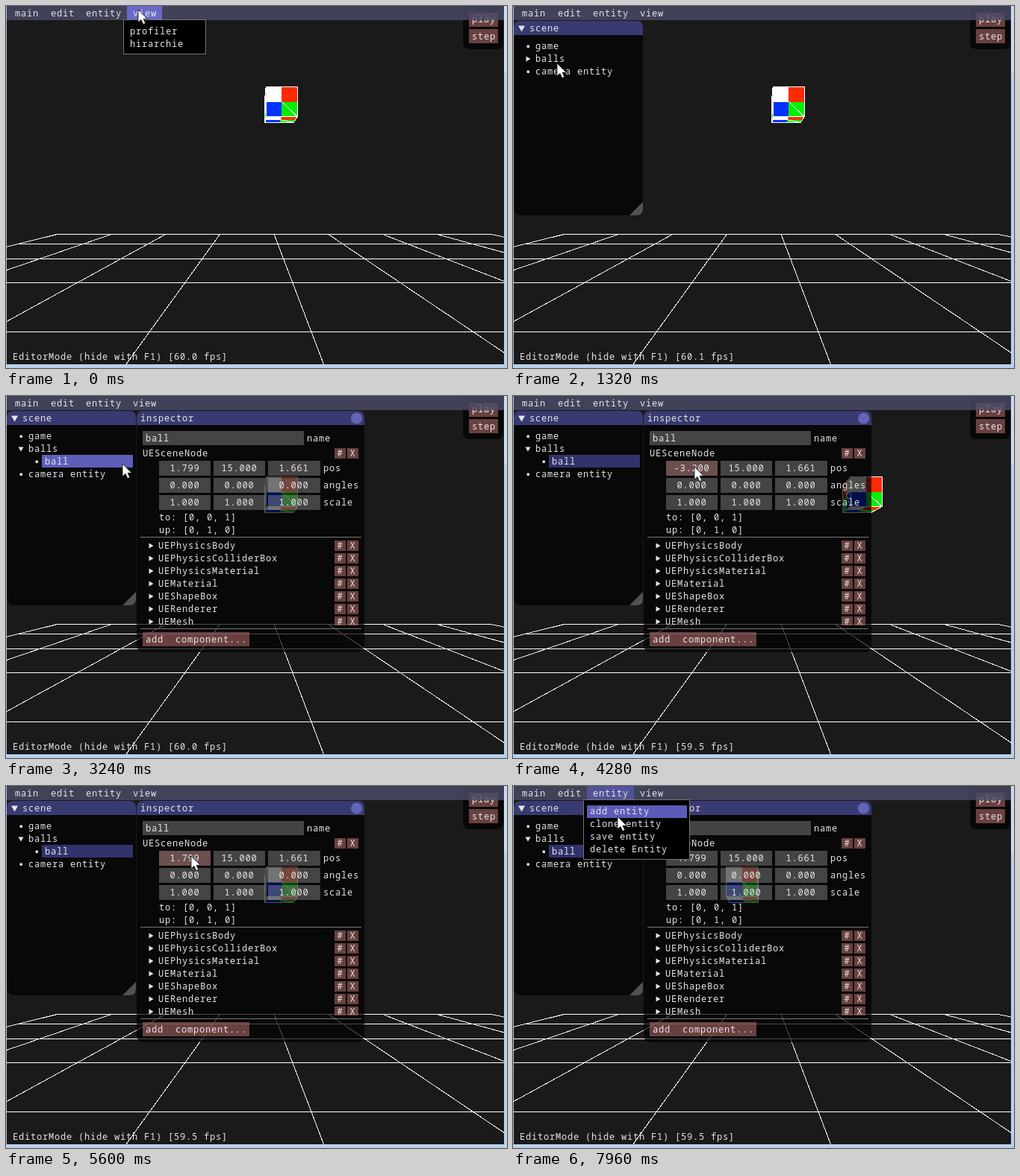
Animation, 671 px wide and 486 px high, one loop 8000 ms. Source, as an HTML page:

```html
<!DOCTYPE html>
<html lang="en">
<head>
<meta charset="utf-8">
<title>Scene editor</title>
<style>
  html, body { margin: 0; width: 100%; height: 100%; overflow: hidden; background: #1a1a1a; }
  svg { display: block; width: 671px; height: 486px; }
  text {
    font: 12px "Noto Sans Mono", "DejaVu Sans Mono", monospace;
    letter-spacing: .8px; fill: #e6e6e6; white-space: pre;
  }
  .mid { text-anchor: middle; }
  .crisp { shape-rendering: crispEdges; }
  .grid { stroke: #fff; fill: none; }
</style>
</head>
<body>
<svg id="stage" viewBox="0 0 671 486" xmlns="http://www.w3.org/2000/svg"></svg>
<script>
const LOOP = 8000, STEP = 40;
const VX = 334, VY = 240.5;         // vanishing point
const EYE = 394.2;                  // floor drop in px at depth 1
const C = {
  field: 'rgba(204,204,204,.3)',
  fieldHover: 'rgba(230,204,204,.4)',
  fieldActive: 'rgba(230,166,166,.45)',
  button: 'rgba(171,102,102,.6)',
  header: 'rgba(102,102,230,.45)',
  headerHover: 'rgba(115,115,230,.8)',
  title: 'rgba(69,69,138,.83)',
  bar: 'rgba(76,76,104,.8)',
  panel: 'rgba(0,0,0,.7)',
  line: '#777'
};

const rect = (x, y, w, h, fill, more = '') =>
  `<rect x="${x}" y="${y}" width="${w}" height="${h}" fill="${fill}" ${more}/>`;
const text = (x, mid, str, more = '') => `<text x="${x}" y="${mid + 4}" ${more}>${str}</text>`;
const poly = (pts, fill, more = '') =>
  `<polygon points="${pts.map(p => p.map(n => n.toFixed(2)).join()).join(' ')}" fill="${fill}" ${more}/>`;
const group = (id, body, more = '') => `<g id="${id}" ${more}>${body}</g>`;
const titleBar = (x, w) =>
  `<path d="M${x} 39V29q0-9 9-9h${w - 18}q9 0 9 9v10z" fill="${C.title}"/>`;
const arrowRight = (x, y) => poly([[x, y - 3.5], [x + 6, y], [x, y + 3.5]], '#e6e6e6');
const arrowDown = (x, y, r) => poly([[x - r, y - r + 1], [x + r, y - r + 1], [x, y + r]], '#e6e6e6');
const dot = (x, y) => rect(x - 1.5, y - 1.5, 3.5, 3.5, '#e6e6e6', 'rx="1"');

function floor() {
  let d = '';
  const edge = i => -264.2 + 72.3 * i;
  const rowY = n => VY + EYE / n;
  for (let n = 2; n <= 6; n++) {
    d += `M${VX + edge(0) * 6 / n} ${Math.floor(rowY(n)) + .5}H${VX + edge(8) * 6 / n}`;
  }
  for (let i = 0; i < 9; i++) d += `M${VX + edge(i)} ${rowY(6)}L${VX + edge(i) * 6} ${rowY(1)}`;
  return `<path class="grid crisp" d="${d}"/>`;
}

function cube(value) {
  const left = 14.2 + 20.8 * (1.7995 - value), right = left + 42;
  const at = (u, v, w) => {
    const s = 21 / (21 + 2 * w);
    return [VX + (left + 42 * u) * s, VY + (-132 + 40 * v) * s];
  };
  const tones = ['#fff', '#ff2a00', '#0033ff', '#00f000'];
  const face = (f, order) => {
    let out = '';
    order.forEach((tone, i) => {
      const a = i % 2 / 2, b = (i >> 1) / 2;
      out += poly([f(a, b), f(a + .5, b), f(a + .5, b + .5), f(a, b + .5)], tones[tone]);
    });
    out += poly([f(0, 0), f(1, 0), f(1, 1), f(0, 1)], 'none', 'stroke="#fff"');
    return out + poly([f(0, 0), f(1, 1)], 'none', 'stroke="#fff"');
  };
  let out = face((a, b) => at(a, 1, b), [0, 1, 2, 3]);
  if (left > 0) out += face((a, b) => at(0, b, 1 - a), [1, 0, 3, 2]);
  if (right < 0) out += face((a, b) => at(1, b, a), [0, 1, 2, 3]);
  return out + face((a, b) => at(a, b, 0), [0, 1, 2, 3]);
}

const toolPanel = () =>
  `<path d="M612 0H666V49q0 9-9 9H621q-9 0-9-9z" fill="${C.panel}"/>` +
  rect(620, 9, 39, 19, C.button) + text(624, 18, 'play') +
  rect(620, 31, 39, 19, C.button) + text(624, 41, 'step');

const menuBar = () =>
  rect(1, 0, 666, 19, C.bar) +
  rect(162, 0, 47, 19, 'none', 'id="viewTab"') + rect(99, 0, 63, 19, 'none', 'id="entityTab"') +
  text(12, 10, 'main') + text(60, 10, 'edit') + text(107, 10, 'entity') + text(170, 10, 'view');

const sceneWindow = () =>
  rect(1, 20, 173, 261, C.panel, 'rx="9"') + titleBar(1, 173) +
  arrowDown(11.5, 30, 4.5) + text(22, 30, 'scene') +
  '<path d="M174 263V272q0 9-9 9H156z" fill="rgba(255,255,255,.3)"/>' +
  rect(48, 79, 122, 17, 'none', 'id="selected"') + rect(0, 0, 0, 17, C.headerHover, 'id="hover"') +
  dot(20, 54) + text(30, 54, 'game') +
  group('closedArrow', arrowRight(17.5, 71)) + text(30, 71, 'balls') +
  group('child', arrowDown(20, 71, 3.5) + dot(41, 88) + text(52, 88, 'ball')) +
  group('camera', dot(20, 88) + text(30, 88, 'camera entity'));

function inspectorWindow() {
  const pair = y => rect(440, y - 7, 15, 14, C.button) + rect(457, y - 7, 15, 14, C.button) +
    text(443.5, y, '#') + text(460.5, y, 'X');
  let out = rect(175, 20, 305, 324, C.panel, 'rx="9" id="inspectorBack"') + titleBar(175, 305) +
    text(180, 30, 'inspector') + '<circle cx="469.5" cy="30" r="7.5" fill="rgba(128,128,230,.6)"/>' +
    rect(183, 47, 216, 19, C.field) + text(187, 57, 'ball', 'id="name"') + text(403, 57, 'name') +
    text(183, 77, 'UESceneNode') + pair(77);
  ['pos', 'angles', 'scale'].forEach((label, r) => {
    const y = 97 + 23 * r;
    [205, 278, 351].forEach((x, c) => {
      out += rect(x, y - 10, c < 2 ? 69 : 70, 20, C.field, `id="f${r}${c}"`) +
        text(x + 34.5, y, r === 2 ? '1.000' : '0.000', `id="v${r}${c}" class="mid"`);
    });
    out += text(425, y, label);
  });
  out += text(205, 163, 'to: [0, 0, 1]') + text(205, 180, 'up: [0, 1, 0]') + rect(180, 189, 296, 1, C.line);
  const parts = ['PhysicsBody', 'PhysicsColliderBox', 'PhysicsMaterial', 'Material', 'ShapeBox', 'Renderer', 'Mesh'];
  out += group('parts', parts.map((p, i) => {
    const y = 201 + 17 * i;
    return arrowRight(191.5, y) + text(204, y, 'UE' + p) + pair(y);
  }).join(''), 'clip-path="url(#partsClip)"');
  return out + group('footer', rect(180, 312, 296, 1, C.line) +
    rect(183, 317, 143, 19, C.button) + text(187, 327, 'add  component...'));
}

const popup = (id, x, w, items) => group(id,
  rect(x + .5, 18.5, w - 1, 12 + 17 * items.length, '#000', 'stroke="#747474"') +
  rect(x + 5, 26, w - 9, 17, 'none', `id="${id}Row"`) +
  items.map((s, i) => text(x + 9, 34 + 17 * i, s)).join(''));

document.getElementById('stage').innerHTML =
  '<defs><clipPath id="partsClip"><rect x="175" y="190" width="305" height="118"/></clipPath></defs>' +
  rect(0, 0, 671, 486, '#1a1a1a') + floor() + group('cube', '', 'class="crisp"') +
  text(9, 471, '', 'id="status"') + toolPanel() +
  group('scene', sceneWindow()) + group('inspector', inspectorWindow()) + menuBar() +
  popup('viewMenu', 157, 111, ['profiler', 'hirarchie']) +
  popup('entityMenu', 94, 143, ['add entity', 'clone entity', 'save entity', 'delete Entity']) +
  rect(0, 0, 1, 486, '#a9c3de') + rect(667, 0, 4, 486, '#b9d1ea') + rect(667, 0, 4, 90, '#cbdcee') +
  rect(0, 481, 671, 5, '#b9d1ea') +
  group('cursor', '<path d="M0 0V17L4 13.4L6.8 19.6L9.8 18.3L7.1 12.3H12.3Z" fill="#fff" stroke="#111" stroke-width=".8"/>');

const ui = {};
document.querySelectorAll('[id]').forEach(e => ui[e.id] = e);

// [time, x, y] of the pointer tip
const path = [
  [0, 177, 5], [160, 182, 24], [400, 190, 48], [680, 190, 52], [840, 190, 52], [1000, 140, 64],
  [1200, 74, 92], [1320, 59, 77], [1400, 54, 71], [1480, 54, 71], [1640, 17, 71], [1720, 18, 71],
  [1880, 18, 71], [2080, 50, 82], [2320, 90, 87], [2600, 90, 87], [2960, 138, 88], [3120, 138, 88],
  [3240, 156, 91], [3320, 226, 108], [3840, 226, 108], [4000, 248, 95], [4080, 248, 95],
  [4640, 234, 94], [4880, 229, 94], [5120, 233, 94], [5480, 244, 94], [5600, 248, 94],
  [5680, 251, 94], [5920, 251, 94], [6320, 190, 98], [6480, 165, 94], [6720, 146, 69],
  [6880, 143, 50], [7080, 141, 25], [7280, 139, 10], [7520, 138, 9], [7640, 138, 9],
  [7840, 140, 34], [7960, 140, 41]
];
const hovers = [
  [0, ''], [1160, 'camera'], [1280, ''], [1360, 'balls'], [1560, 'arrow'], [2080, 'ball'],
  [3280, ''], [6480, 'ball'], [6760, 'balls'], [6840, 'game'], [6960, '']
];
const rates = [
  [0, '60.0'], [520, '59.5'], [1080, '60.1'], [1720, '60.0'], [2200, '59.5'], [2720, '60.0'],
  [3560, '59.5'], [3600, '60.0'], [4200, '59.5'], [4800, '59.0'], [5400, '59.5'],
  [6200, '60.0'], [7760, '59.5']
];
const rows = { arrow: [9, 63, 17], game: [26, 46, 144], balls: [26, 63, 144], ball: [48, 79, 122], camera: [26, 80, 144] };

const stepAt = (list, t) => list.filter(k => k[0] <= t).pop()[1];
function pointAt(t) {
  const i = path.findIndex(k => k[0] > t);
  if (i < 0) return path[path.length - 1].slice(1);
  const [t0, x0, y0] = path[i - 1], [t1, x1, y1] = path[i], p = (t - t0) / (t1 - t0);
  return [Math.round(x0 + (x1 - x0) * p), Math.round(y0 + (y1 - y0) * p)];
}

const show = (el, on) => el.setAttribute('display', on ? 'inline' : 'none');
const set = (el, attrs) => { for (const k in attrs) el.setAttribute(k, attrs[k]); };
const fixed = n => (Math.trunc(n * 1000) / 1000).toFixed(3);

function menu(name, open, y, count) {
  const row = Math.floor((y - 26) / 17);
  show(ui[name + 'Menu'], open);
  set(ui[name + 'MenuRow'], { fill: row >= 0 && row < count ? C.headerHover : 'none', y: 26 + 17 * row });
  return open ? (y < 19 ? C.headerHover : C.header) : 'none';
}

let lastValue;
function draw(t) {
  const [x, y] = pointAt(t);
  set(ui.cursor, { transform: `translate(${x} ${y})` });
  ui.status.textContent = `EditorMode (hide with F1) [${stepAt(rates, t)} fps]`;

  const entityFill = menu('entity', t >= 7600, y, 4);
  const overEntity = t > 7000 && y < 19;
  set(ui.viewTab, { fill: menu('view', t < 560, y, 2) });
  set(ui.entityTab, { fill: overEntity ? C.headerHover : entityFill });

  const expanded = t >= 1880, picked = t >= 2600;
  show(ui.scene, t >= 560);
  show(ui.closedArrow, !expanded);
  show(ui.child, expanded);
  set(ui.camera, { transform: `translate(0 ${expanded ? 17 : 0})` });
  const row = stepAt(hovers, t);
  show(ui.hover, row);
  if (row) set(ui.hover, { x: rows[row][0], y: rows[row][1], width: rows[row][2] });
  set(ui.selected, { fill: picked && row !== 'ball' ? C.header : 'none' });

  show(ui.inspector, t >= 1480);
  show(ui.parts, picked);
  set(ui.footer, { transform: `translate(0 ${picked ? 0 : -119})` });
  set(ui.inspectorBack, { height: picked ? 324 : 205 });
  ui.name.textContent = picked ? 'ball' : 'balls';

  const moved = t < 4080 ? 0 : t < 5680 ? x - 248 : 3;
  const value = 1.7995 + moved;
  ui.v00.textContent = picked ? fixed(value) : '0.000';
  ui.v01.textContent = picked ? '15.000' : '0.000';
  ui.v02.textContent = picked ? '1.661' : '0.000';
  const dragging = t >= 4040 && t <= 5680;
  const over = x >= 205 && x < 274 && y >= 87 && y < 107 && t > 3400;
  set(ui.f00, { fill: dragging ? C.fieldActive : over ? C.fieldHover : C.field });
  if (value !== lastValue) ui.cube.innerHTML = cube(lastValue = value);
}

let start;
function tick(now) {
  if (start === undefined) start = now;
  const t = (now - start) % LOOP;
  draw(Math.floor(t / STEP) * STEP);
  requestAnimationFrame(tick);
}
draw(0);
requestAnimationFrame(tick);
</script>
</body>
</html>
```
